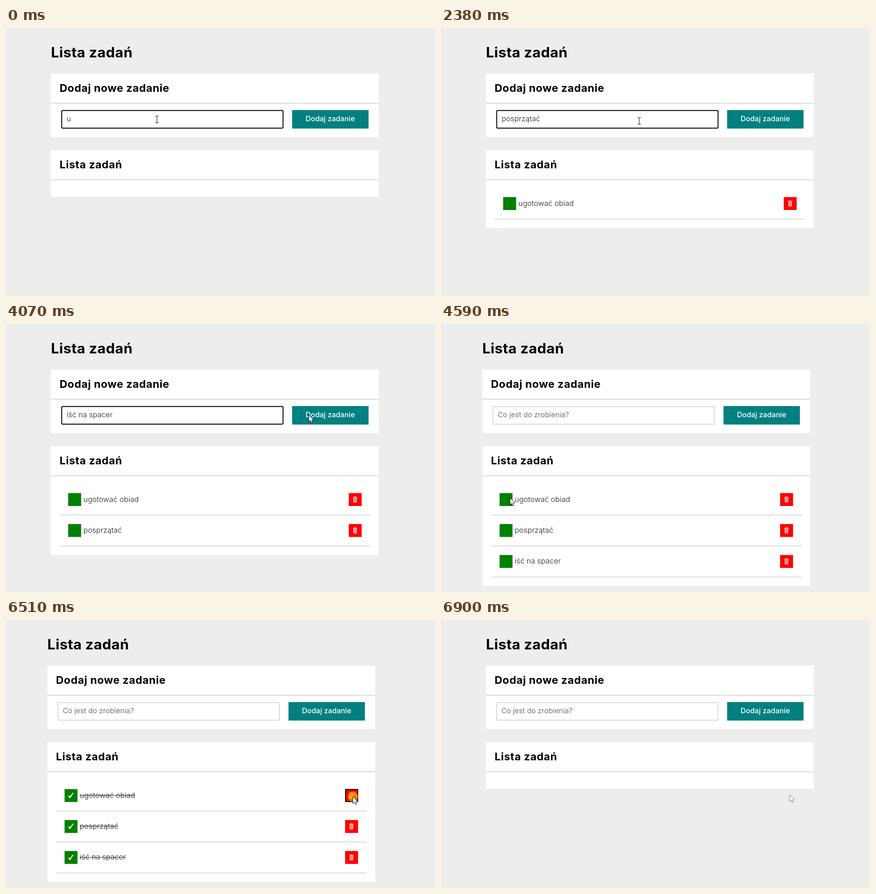
An HTML page with a canvas for the animation above (7.03 s loop, 945x592 px).

```html
<!DOCTYPE html>
<html lang="pl">
<head>
<meta charset="utf-8">
<title>Lista zadań</title>
<style>
html, body { margin: 0; width: 100%; height: 100%; overflow: hidden; background: #ededed; }
canvas { display: block; }
</style>
</head>
<body>
<canvas id="stage" width="945" height="592"></canvas>
<script>
const ctx = document.getElementById("stage").getContext("2d");
const LOOP = 7030;
const TICK = 130;
const ROW = 68.4;
const DELETE_START = 6510;

const TASKS = [
  { name: "ugotować obiad", typeAt: -7.5, keyTime: 57.5, addAt: 1490, checkAt: 4720 },
  { name: "posprzątać", typeAt: 1880, keyTime: 50, addAt: 3160, checkAt: 5240 },
  { name: "iść na spacer", typeAt: 3340, keyTime: 50, addAt: 4200, checkAt: 5630 }
];

// The pointer eases to each place in a few ticks; lift bends the path upwards.
const HOME = { x: 332, y: 202 };
const MOVES = [
  { at: 840, ticks: 5, x: 664, y: 205, lift: 20 },
  { at: 1620, ticks: 2, x: 436, y: 205 },
  { at: 2640, ticks: 4, x: 667, y: 201 },
  { at: 4200, ticks: 4, x: 152, y: 384 },
  { at: 4850, ticks: 3, x: 149, y: 456 },
  { at: 5370, ticks: 2, x: 149, y: 523 },
  { at: 6380, ticks: 2, x: 764, y: 390 },
  { at: DELETE_START + TICK, ticks: 2, x: 768, y: 386 }
];

const clamp = (v, min, max) => Math.min(max, Math.max(min, v));
const ease = p => p * p * (3 - 2 * p);
const isDeleting = t => t >= DELETE_START && t < DELETE_START + TASKS.length * TICK;

function pointerAt(t) {
  const index = MOVES.findLastIndex(move => move.at <= t);
  if (index < 0) return HOME;
  const { at, ticks, x, y, lift = 0 } = MOVES[index];
  const from = MOVES[index - 1] || HOME;
  const p = ease(Math.min(1, (Math.floor((t - at) / TICK) + 1) / ticks));
  return {
    x: from.x + (x - from.x) * p,
    y: from.y + (y - from.y) * p - lift * Math.sin(Math.PI * p)
  };
}

function typedText(t) {
  const task = TASKS.find(({ typeAt, addAt }) => t >= typeAt && t < addAt);
  return task ? task.name.slice(0, Math.floor((t - task.typeAt) / task.keyTime) + 1) : "";
}

function visibleTasks(t) {
  const removed = clamp(Math.floor((t - DELETE_START) / TICK), 0, TASKS.length);
  return TASKS.slice(removed).filter(task => t >= task.addAt);
}

function box(x, y, w, h, color) {
  ctx.fillStyle = color;
  ctx.fillRect(x, y, w, h);
}

function text(str, x, y, size, weight, color, spacing = 0) {
  ctx.font = `${weight} ${size}px Inter, sans-serif`;
  ctx.letterSpacing = spacing + "px";
  ctx.fillStyle = color;
  ctx.fillText(str, x, y);
  return ctx.measureText(str).width;
}

function shape(points, close) {
  ctx.beginPath();
  points.forEach(([x, y]) => ctx.lineTo(x, y));
  if (close) ctx.closePath();
}

function drawAt(x, y, paint) {
  ctx.save();
  ctx.translate(x, y);
  paint();
  ctx.restore();
}

function drawPanel(y, height, title) {
  box(99, y, 722, height, "#fff");
  box(99, y + 64.3, 722, 1.9, "#d9d9d9");
  text(title, 118, y + 40, 23.5, 700, "#000", 0.65);
}

function drawForm(t) {
  drawPanel(101, 140, "Dodaj nowe zadanie");

  const focused = t < 4590;
  ctx.lineWidth = 2;
  ctx.strokeStyle = focused ? "#000" : "#d9d9d9";
  ctx.beginPath();
  ctx.roundRect(122.7, 182.3, 487.6, 39, focused ? 2.5 : 0);
  ctx.stroke();

  const value = typedText(t);
  if (value) {
    text(value, 133.5, 206.4, 16.4, 300, "#222");
  } else {
    text("Co jest do zrobienia?", 133, 206.4, 15.8, 400, "#757575");
    if (focused) box(133, 193, 1, 18, "#000");
  }

  box(630.3, 181.3, 168.3, 40.8, "#008080");
  text("Dodaj zadanie", 660, 206.4, 16, 500, "#fff");
}

function trash() {
  ctx.strokeStyle = "#fff";
  ctx.lineWidth = 1;
  ctx.fillStyle = "rgba(255,255,255,.3)";
  shape([[-3.5, -4], [-3, 6], [3, 6], [3.5, -4]]);
  ctx.fill();
  ctx.stroke();
  box(-4.5, -5.5, 9, 1.3, "#fff");
  box(-1.5, -6.8, 3, 1.3, "#fff");
  for (const x of [-1.5, 0.7]) box(x, -3, 0.8, 7.5, "#fff");
}

function checkMark() {
  shape([[-6, 1], [-3.8, -0.3], [-2, 2.4], [4, -6], [6, -6], [-1, 5.5], [-2.5, 5.5]], true);
  ctx.fillStyle = "#fff";
  ctx.fill();
}

function drawTask(task, row, t) {
  const top = 373.5 + row * ROW;
  const middle = top + 14.2;
  const done = t >= task.checkAt;
  box(137, top, 28.5, 28.5, "#008000");
  if (done) drawAt(150.8, middle, checkMark);

  const width = text(task.name, 170.5, top + 19, 16.4, 300, "#222");
  if (done) box(170.5, Math.round(middle) - 1, width, 1, "#222");

  box(755, top, 28.5, 28.5, "#f00");
  drawAt(769, middle, trash);
  if (row === 0 && isDeleting(t)) {
    ctx.strokeStyle = "#000";
    ctx.lineWidth = 2;
    ctx.strokeRect(756, top + 1, 26.5, 26.5);
  }
  box(118, top + 47.6, 684, 1.9, "#d9d9d9");
}

function arrow() {
  shape([[0, 0], [0, 15.5], [3.6, 12.2], [6, 17.5], [8.6, 16.3], [6.3, 11.3], [11, 11]], true);
  ctx.lineWidth = 1;
  ctx.fillStyle = "#fff";
  ctx.fill();
  ctx.stroke();
}

function beam() {
  box(0, -7, 1, 15, "#000");
  for (const y of [-8, 7]) {
    for (const x of [-3, 1]) box(x, y, 3, 1, "#000");
  }
}

function drawPointer(t) {
  const { x, y } = pointerAt(t);
  if (isDeleting(t)) {
    ctx.fillStyle = "rgba(255,165,0,.75)";
    ctx.beginPath();
    ctx.arc(x, y, 11, 0, Math.PI * 2);
    ctx.fill();
  }
  const overInput = x > 122 && x < 611 && y > 181 && y < 222;
  ctx.strokeStyle = visibleTasks(t).length || t < DELETE_START ? "#000" : "#777";
  drawAt(Math.round(x), Math.round(y), overInput ? beam : arrow);
}

function draw(t) {
  const tasks = visibleTasks(t);
  // A full list overflows the page, and its scrollbar pushes the content left.
  const shift = tasks.length === TASKS.length ? -8 : 0;
  box(0, 0, 945, 592, "#ededed");
  drawAt(shift, 0, () => {
    text("Lista zadań", 99, 65, 31.5, 700, "#000", 0.4);
    drawForm(t);
    drawPanel(270, 103.5 + tasks.length * ROW, "Lista zadań");
    tasks.forEach((task, row) => drawTask(task, row, t));
  });
  drawPointer(t);
}

function frame() {
  draw(performance.now() % LOOP);
  requestAnimationFrame(frame);
}
frame();
</script>
</body>
</html>
```
